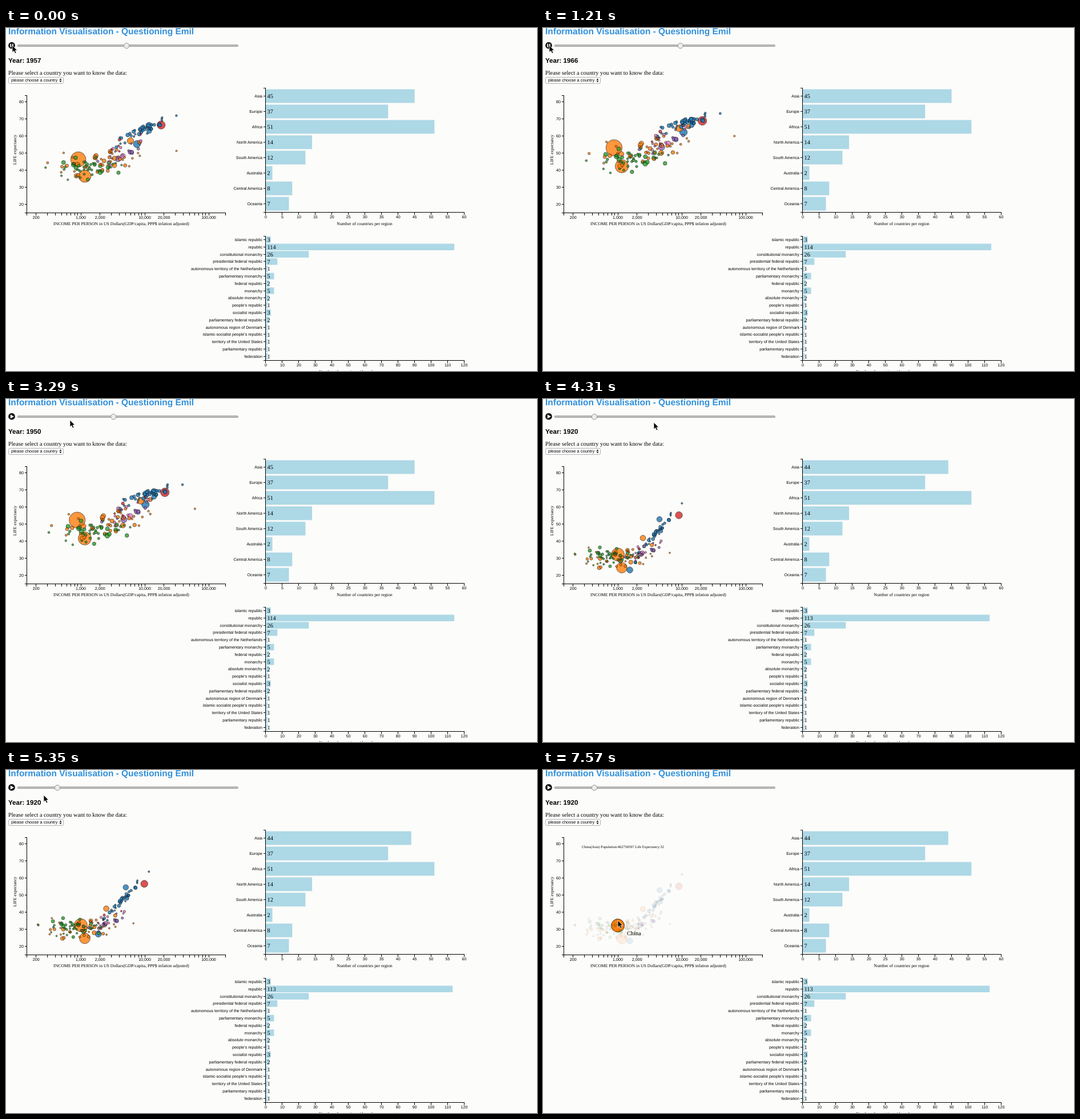
Recreate the animation shown at these times as an HTML page. Size 930x602 px, loop 8000 ms.

```html
<!DOCTYPE html>
<html lang="en">
<head>
<meta charset="utf-8">
<title>Information Visualisation</title>
<style>
html, body { margin: 0; width: 100%; height: 100%; overflow: hidden; background: #fcfcfa; }
svg { display: block; text-rendering: geometricPrecision; }
text { font-family: "Liberation Sans", Arial, sans-serif; font-size: 7.1px; }
.serif { font-family: "Liberation Serif", "Times New Roman", serif; }
.axis { fill: none; stroke: #000; shape-rendering: crispEdges; }
</style>
</head>
<body>
<svg id="stage" width="930" height="602" viewBox="0 0 930 602"></svg>
<script>
const stage = document.getElementById('stage');

function el(tag, attrs, text) {
  const node = document.createElementNS('http://www.w3.org/2000/svg', tag);
  set(node, attrs);
  if (text !== undefined) node.textContent = text;
  stage.append(node);
  return node;
}
function set(node, attrs) {
  for (const key in attrs) node.setAttribute(key, attrs[key]);
}
const label = (x, y, text, anchor = 'start', style = '') =>
  el('text', { x, y, 'text-anchor': anchor, style }, text);
const serif = (x, y, text, size, anchor = 'start') => {
  const node = label(x, y, text, anchor, `font-size:${size}px`);
  node.setAttribute('class', 'serif');
  return node;
};
const axis = d => el('path', { class: 'axis', d });
const show = (node, on) => node.setAttribute('visibility', on ? 'visible' : 'hidden');
const lerp = (a, b, f) => a + (b - a) * f;

// Piecewise linear track: rows of [step, ...values]
function track(rows, k) {
  const i = rows.findIndex(row => row[0] > k);
  if (i < 0) return rows[rows.length - 1].slice(1);
  if (i === 0) return rows[0].slice(1);
  const a = rows[i - 1], b = rows[i];
  const f = (k - a[0]) / (b[0] - a[0]);
  return a.slice(1).map((v, j) => lerp(v, b[j + 1], f));
}

// Header and controls
label(4, 11, 'Information Visualisation - Questioning Emil', 'start', 'font-size:15.46px;font-weight:bold;fill:#3090dc');
el('rect', { x: 20, y: 29.5, width: 386.5, height: 3, rx: 1.5, fill: '#bdbdbd', stroke: '#8b8b8b', 'stroke-width': .7 });
const knob = el('circle', { cy: 31.2, r: 4.7, fill: '#ececec', stroke: '#8a8a8a', 'stroke-width': .9 });
el('circle', { cx: 10, cy: 30.7, r: 5.9, fill: '#111' });
const button = el('path', { fill: '#fff' });
const yearText = label(4, 61.3, '', 'start', 'font-size:11.6px;font-weight:bold');
serif(4, 82, 'Please select a country you want to know the data:', 10.3);
el('rect', { x: 4.5, y: 86.5, width: 96, height: 11, rx: 2.5, fill: '#fff', stroke: '#aaa', 'stroke-width': .9 });
label(9, 94.4, 'please choose a country', 'start', 'font-size:7.5px');
el('path', { d: 'M93.5 91.2h4l-2 -3zM93.5 92.6h4l-2 3z', fill: '#222' });

// Scatter axes
const incomeX = v => 131 + 112 * Math.log10(v / 1000);
axis('M32.5 118.5H36.5V324.5H32.5M36.5 328.5V324.5H384.5V328.5');
for (let v = 20; v <= 80; v += 10) {
  const y = 369.3 - 2.992 * v;
  axis(`M32.5 ${y}H36.5`);
  label(31, y + 2.5, v, 'end');
}
for (let decade = 100; decade <= 1e5; decade *= 10) {
  for (let m = decade === 100 ? 2 : 1; m < 10; m++) {
    const v = m * decade;
    if (v > 1e5) break;
    axis(`M${incomeX(v)} 324.5V328.5`);
    if (v === 200 || (v >= 1000 && m < 3)) label(incomeX(v), 334.5, v.toLocaleString('en-US'), 'middle');
  }
}
serif(202, 346, 'INCOME PER PERSON in US Dollars(GDP/capita, PPP$ infation adjusted)', 7.73, 'middle');
set(serif(0, 0, 'LIFE expectancy', 7.73, 'middle'), { transform: 'translate(17.5 213.5) rotate(-90)' });

// Bar charts; a row lists its counts for the early, middle and late era
const regions = [['Asia', 44, 45, 45], ['Europe', 37, 37, 38], ['Africa', 51], ['North America', 14, 14, 15],
  ['South America', 12], ['Australia', 2], ['Central America', 8], ['Oceania', 7, 7, 8]];
const governments = [['islamic republic', 3], ['republic', 113, 114, 116], ['constitutional monarchy', 26, 26, 27],
  ['presidential federal republic', 7], ['autonomous territory of the Netherlands', 1],
  ['parliamentary monarchy', 5], ['federal republic', 2], ['monarchy', 5], ['absolute monarchy', 2],
  ["people's republic", 1], ['socialist republic', 3], ['parliamentary federal republic', 2],
  ['autonomous region of Denmark', 1], ["islamic-socialist people's republic", 1],
  ['territory of the United States', 1], ['parliamentary republic', 1], ['federation', 1]];

function barChart(rows, top, bottom, first, pitch, height, max, step) {
  const unit = 347.5 / max;
  const bars = rows.map((row, i) => {
    const y = first + pitch * i;
    const bar = el('rect', { x: 455, y: y - height / 2, height, fill: '#add8e6' });
    axis(`M450.5 ${y}H454.5`);
    label(449, y + 2.5, row[0], 'end');
    return { row, bar, count: serif(457.5, y + 3.6, '', 10.3) };
  });
  axis(`M450.5 ${top}H454.5V${bottom}H450.5M454.5 ${bottom + 4}V${bottom}H802.5V${bottom + 4}`);
  for (let v = 0; v <= max; v += step) {
    axis(`M${454.7 + v * unit} ${bottom}V${bottom + 4}`);
    label(455 + v * unit, bottom + 10.5, v, 'middle');
  }
  return era => bars.forEach(({ row, bar, count }) => {
    const n = row[1 + era] ?? row[1];
    bar.setAttribute('width', n * unit);
    count.textContent = n;
  });
}
const showRegions = barChart(regions, 105.5, 323.5, 119.5, 27, 24, 60, 5);
const showGovernments = barChart(governments, 365.5, 583.5, 371.5, 12.8, 11.5, 120, 10);
serif(628, 346, 'Number of countries per region', 7.73, 'middle');
serif(623, 606, 'Number of countries with each government type', 7.73, 'middle');

// Bubbles drift from a poor, short-lived place to a richer, longer-lived one
const ORANGE = '#ff7f0e', GREEN = '#2ca02c', BLUE = '#1f77b4', RED = '#d62728', PURPLE = '#9467bd', PINK = '#e377c2';

// Large countries: colour, radius, first x, y and last x, y
const large = [
  [ORANGE, 13, 131, 273, 122, 187],
  [ORANGE, 10.6, 138, 296, 138, 223],
  [RED, 7, 238, 204, 286, 156],
  [BLUE, 6.1, 152, 300, 262, 163],
  [ORANGE, 5.5, 175, 244, 262, 151],
  [BLUE, 5.4, 204, 211, 270, 154],
  [PURPLE, 5, 172, 272, 221, 186],
  [PINK, 4.1, 174, 270, 236, 178],
  [ORANGE, 1.5, 222, 270, 377, 160]
];
// Regions of small ones: count, scatter, then first and last centre with slope
const groups = [
  { n: 48, sx: 34, sy: 10, colors: [GREEN], from: [116, 276, -.05], to: [168, 213, -.2] },
  { n: 44, sx: 48, sy: 13, colors: [ORANGE], from: [142, 276, -.1], to: [210, 183, -.3] },
  { n: 24, sx: 21, sy: 9, colors: [PURPLE, PINK, PURPLE, RED, PINK], from: [172, 269, -.3], to: [217, 176, -.35] },
  { n: 37, sx: 27, sy: 5.5, colors: [BLUE], from: [198, 237, -1.2], to: [258, 156, -.15] }
];

let seed = 11;
function rand() {
  seed = (seed * 16807) % 2147483647;
  return seed / 2147483647;
}
const bell = () => (rand() + rand() - 1) * 2.45;

const bubbles = large.map(([color, r, x0, y0, x1, y1]) => ({
  color, r, at: d => [lerp(x0, x1, d), lerp(y0, y1, d)]
}));
for (const { n, sx, sy, colors, from, to } of groups) {
  for (let i = 0; i < n; i++) {
    const u = bell() * sx, v = bell() * sy;
    bubbles.push({
      color: colors[i % colors.length],
      r: 1.6 + 2.8 * rand() ** 3,
      at: d => {
        const [x, y, slope] = from.map((a, j) => lerp(a, to[j], d));
        const spread = lerp(.74, 1.04, d);
        return [x + u * spread, y + (u * slope + v) * spread];
      }
    });
  }
}
const china = bubbles[0];
bubbles.sort((a, b) => b.r - a.r);
for (const b of bubbles) {
  b.pace = b.color === BLUE || b.color === RED ? .5 : 1;
  b.node = el('circle', { fill: b.color, stroke: '#000', 'stroke-width': .7 });
}

const tips = [serif(68, 137, 'China(Asia) Population:462750597 Life Expectancy:32', 6.44), serif(147, 289.5, 'China', 10.3)];
const arrow = el('path', { d: 'M0 0V12.2L2.8 9.6L4.8 14L7 13L5 8.8H8.7Z', fill: '#000', stroke: '#fff', 'stroke-width': .8 });
const beam = el('path', { d: 'M-2.5 -6Q0 -6 0 -4Q0 -6 2.5 -6M0 -4V4M-2.5 6Q0 6 0 4Q0 6 2.5 6M-1.3 2H1.3', fill: 'none', stroke: '#222' });

// Play, pause, drag the slider back and forth, then hover
const STEP = 148.6, LOOP = 8000, LAG = 1.6, PAUSE = 13, HOVER = 44;
const years = [[0, 1957], [12.4, 1971], [19.5, 1971], [22, 1950], [26, 1920], [29, 1920], [32, 1948], [35, 1920]];
const pointer = [[PAUSE, 11, 30.5], [15, 209, 6], [16, 209, 6], [18, 256, 30], [19, 256, 30], [22, 112, 37],
  [25, 90, 38], [29, 194, 41], [36, 66, 44], [43, 129, 263], [49, 129, 263], [51, 131, 264]];
const yearAt = k => track(years, k)[0];

function draw(k) {
  const year = Math.round(yearAt(k));
  yearText.textContent = 'Year: ' + year;
  knob.setAttribute('cx', 90 + 3.275 * (year - 1920));
  button.setAttribute('d', k < PAUSE ? 'M7.3 27.7h1.8v6h-1.8zM10.9 27.7h1.8v6h-1.8z' : 'M7.8 27.2L14 30.7L7.8 34.2Z');

  const era = year < 1940 ? 0 : year < 1969 ? 1 : 2;
  showRegions(era);
  showGovernments(era);

  // Bubbles trail the slider
  const growth = ((yearAt(k - LAG) - 1920) / 51) ** 2.2;
  const hover = k >= HOVER;
  const fade = hover ? .8 - .7 * Math.min(1, (k - HOVER + 1) / 4) : .8;
  for (const b of bubbles) {
    const [cx, cy] = b.at(growth ** b.pace);
    set(b.node, { cx, cy, r: b.r * lerp(.88, 1.17, growth), opacity: hover && b === china ? 1 : fade });
  }
  tips.forEach(tip => show(tip, hover));

  const [x, y] = track(pointer, k);
  set(arrow, { transform: `translate(${x} ${y})` });
  set(beam, { transform: `translate(${x} ${y})` });
  show(arrow, y >= 14);
  show(beam, y < 14);
}

const start = performance.now();
let shown = -1;
function tick() {
  const k = Math.floor(((performance.now() - start) % LOOP) / STEP + .1);
  if (k !== shown) draw(shown = k);
  requestAnimationFrame(tick);
}
tick();
</script>
</body>
</html>
```
